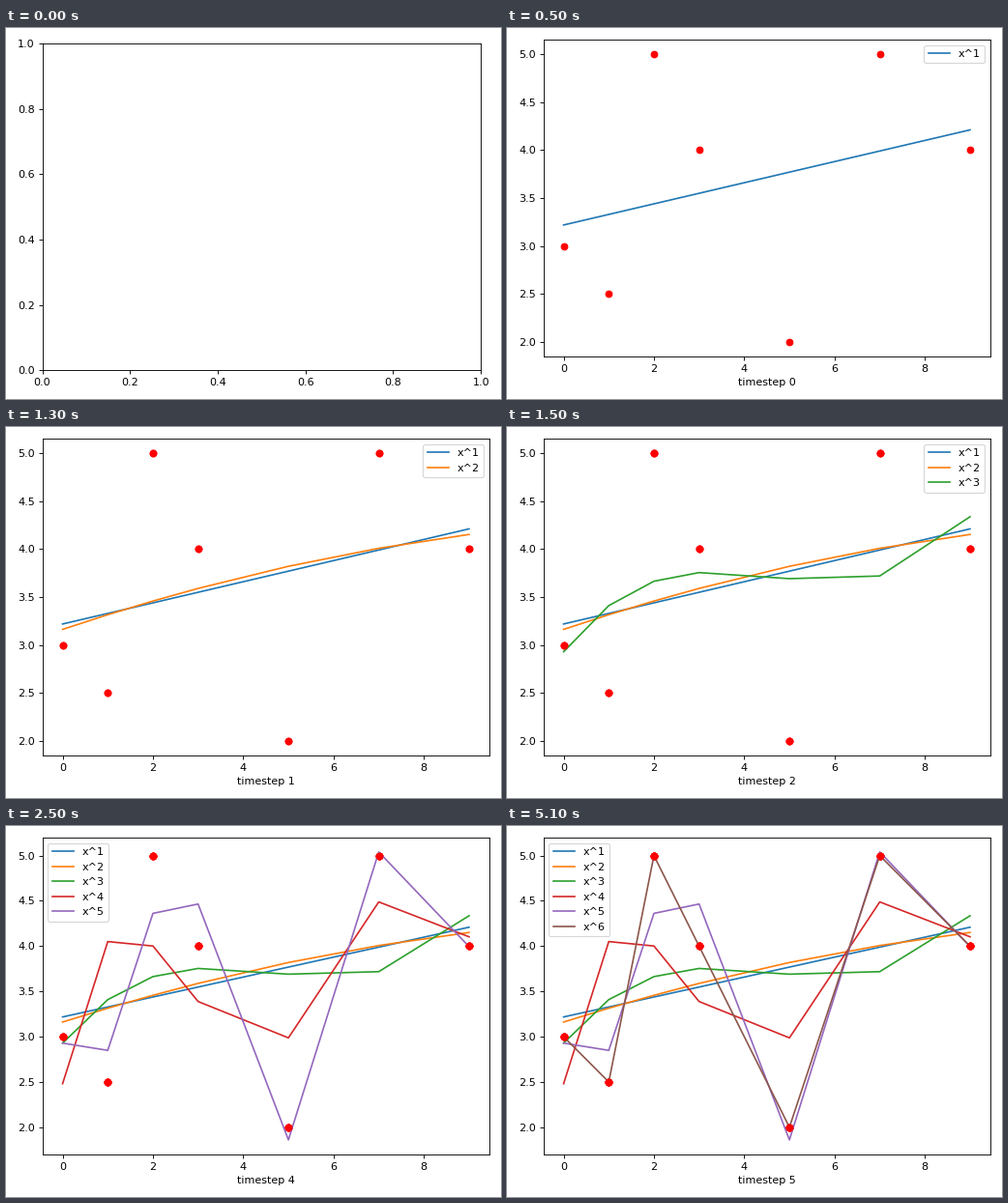
These frames come from a looping animation (512x384 px, 6.5 s). A matplotlib script:

```python
import numpy as np
import matplotlib.pyplot as plt
from matplotlib.animation import FuncAnimation

STEP_MS = 500
LOOP_MS = 6500
MAX_DEGREE = 6

x = np.array([0, 1, 2, 3, 5, 7, 9])
y = np.array([3, 2.5, 5, 4, 2, 5, 4])

fig, ax = plt.subplots(figsize=(6.4, 4.8), dpi=80, layout="tight")


def draw(frame):
    """Start from empty axes, then add one polynomial fit per step."""
    ax.clear()
    top_degree = min(frame, MAX_DEGREE)
    if top_degree == 0:
        return
    for degree in range(1, top_degree + 1):
        fit = np.polyfit(x, y, degree)
        ax.plot(x, np.polyval(fit, x), label=f"x^{degree}")
        # The points are stamped again with every fit.
        ax.plot(x, y, "ro")
    ax.set_xlabel(f"timestep {top_degree - 1}")
    ax.legend()


anim = FuncAnimation(fig, draw, frames=LOOP_MS // STEP_MS, interval=STEP_MS,
                     init_func=lambda: draw(0), repeat=True, repeat_delay=0)
plt.show()
```
